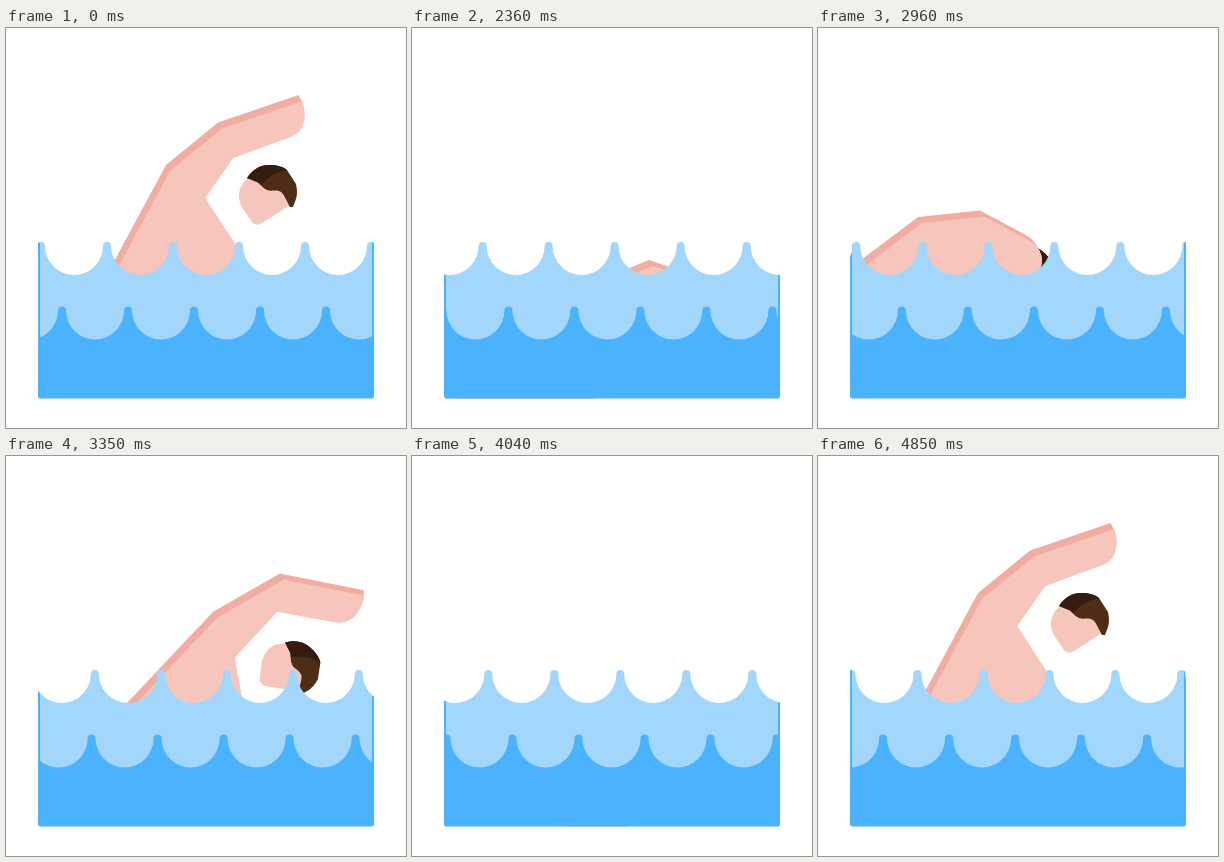
An HTML page that plays this animation: 400x400 px, repeating every 4.88 s.

```html
<!DOCTYPE html>
<html lang="en">
<head>
<meta charset="utf-8">
<title>Swimmer</title>
<style>
  html, body { margin: 0; width: 100%; height: 100%; overflow: hidden; background: #fff; }
  svg { display: block; width: 100vw; height: 100vh; }
</style>
</head>
<body>
<svg viewBox="0 0 400 400">
  <defs>
    <clipPath id="pool"><rect x="32" y="0" width="336" height="370.5" rx="3"/></clipPath>
    <clipPath id="inner"><rect x="34" y="0" width="332" height="360"/></clipPath>
    <clipPath id="sides"><path d="M32 0h3v400h-3zM365 0h3v400h-3z"/></clipPath>
    <clipPath id="skin"><path id="skinShape"/></clipPath>
    <clipPath id="hair"><path id="hairShape" d="M-21-17C-15-26-8-30 1-30C9-30 16-28 19-25L28-11Q30-2 28 4L25 12H22C19 7 16-1 13-3C8-6 3-3-1-5C-6-7-8-12-11-13Q-16-15-21-17Z"/></clipPath>
  </defs>
  <g clip-path="url(#pool)">
    <g id="head">
      <path fill="#f6c6bd" d="M-20-17C-31-8-31 4-25 14L-16 27Q-12 32-6 28L22 10L8-16Z"/>
      <use href="#hairShape" fill="#4e2d17"/>
      <path fill="#351c10" clip-path="url(#hair)" d="M-24-14L-12-34H12L20-25Q4-23-7-10L-12-10Z"/>
    </g>
    <use href="#skinShape" fill="#f2aca2"/>
    <g clip-path="url(#skin)">
      <use href="#skinShape" x="4" y="6" fill="#f6c6bd"/>
    </g>
    <path id="back" fill="#4bb2fd" clip-path="url(#sides)"/>
    <path id="light" fill="#a2d6fb" clip-path="url(#inner)"/>
    <path id="front" fill="#4bb2fd"/>
  </g>
</svg>
<script>
const LOOP = 4880, START = 2000, STEP = 30, PERIOD = 66;
const set = (id, name, value) => document.getElementById(id).setAttribute(name, value);
const mix = (a, b, k) => a + (b - a) * k;

// Turn an offset by an angle and add it to a point
function place([x, y], [dx, dy], deg) {
  const a = deg * Math.PI / 180, c = Math.cos(a), s = Math.sin(a);
  return [x + dx * c - dy * s, y + dx * s + dy * c];
}

const HIP = 0, SHOULDER = 1, ELBOW = 2, TIP = 3, CROOK = 4, ARMPIT = 5, HEAD = 6;

// pts follow the order above; hand, side and head are angles
const reach = {
  pts: [[84, 278], [160, 137], [212, 94.5], [292.5, 67], [227, 130], [199, 170], [262, 167]],
  hand: -19, side: 57, head: 0
};
const dive = {
  pts: [[88, 282], [208, 156], [275, 118], [359, 135.5], [272, 156], [229, 202], [284, 214]],
  hand: 12, side: 80, head: 42
};
const rise = {
  pts: [[19, 250], [100, 189], [162, 182.5], [206, 206], [205, 258], [177, 231], [205, 246]],
  hand: -47, side: 44, head: 42
};

// Shift a pose and roll it about the elbow
function move(p, dx, dy, roll) {
  const [ex, ey] = p.pts[ELBOW];
  return {
    pts: p.pts.map(([x, y]) => place([ex + dx, ey + dy], [x - ex, y - ey], roll)),
    hand: p.hand + roll, side: p.side + roll, head: p.head + roll
  };
}
const sink = move(dive, -38, 114, 7);
const gone = move(dive, -68, 174, 7);
const below = move(rise, -20, 72, 0);

const linear = u => u;
const easeIn = u => u ** 1.35;

// One stroke around the moment of full reach; a slower pace also rises more softly
const stroke = (top, pace) => [
  [top - 11 * pace, below, linear],
  [top - 5.7 * pace, rise, linear],
  [top, reach, u => 1 - (1 - u) ** pace],
  [top + 7.4, dive, easeIn],
  [top + 12, sink, linear],
  [top + 16, gone, linear]
];
const LAST = 91;
const keys = [...stroke(0, 1), ...stroke(37.7, 1), ...stroke(LAST, 2)];

function poseAt(n) {
  const t = Math.min(n, LAST);
  const i = keys.findIndex(key => key[0] >= t);
  const [t0, a] = keys[i - 1], [t1, b, ease] = keys[i];
  const k = ease((t - t0) / (t1 - t0));
  const blend = name => mix(a[name], b[name], k);
  return {
    pts: a.pts.map(([x, y], j) => [mix(x, b.pts[j][0], k), mix(y, b.pts[j][1], k)]),
    hand: blend('hand'), side: blend('side'), head: blend('head')
  };
}

function drawBody(n) {
  const { pts, hand, side, head } = poseAt(n);
  const tip = (along, down) => place(pts[TIP], [along, down], hand);
  const waist = place(pts[ARMPIT], [116, 0], side);
  set('skinShape', 'd', `M${pts[HIP]}L${pts[SHOULDER]}L${pts[ELBOW]}L${pts[TIP]}L${tip(1.5, 9)}`
    + `Q${tip(-1, 37.5)} ${tip(-24, 37)}L${pts[CROOK]}L${pts[ARMPIT]}L${waist}Z`);
  set('head', 'transform', `translate(${pts[HEAD]}) rotate(${head})`);
}

// Distance run by the water: slow, fast, slow
function flow(n, total, span, power) {
  const u = n / span, a = u ** power, b = (1 - u) ** power;
  return total * a / (a + b);
}

function wave(id, first, y, run) {
  const phase = ((first - run) % PERIOD + PERIOD) % PERIOD;
  const crests = 'a4 4 0 0 1 8 0a29 29 0 0 0 58 0'.repeat(8);
  set(id, 'd', `M${phase - PERIOD - 4} ${y}${crests}V400H-100Z`);
}

function draw(n) {
  drawBody(n);
  const far = flow(n, 466, 97, 1.36), near = flow(n, 399, 102, 1.33);
  wave('back', 35, 218, far);
  wave('light', 35, 218, far);
  wave('front', 56, 282.5, near);
}

function tick() {
  const t = performance.now() % LOOP;
  draw(Math.max(0, Math.floor((t - START) / STEP)));
  requestAnimationFrame(tick);
}
tick();
</script>
</body>
</html>
```
